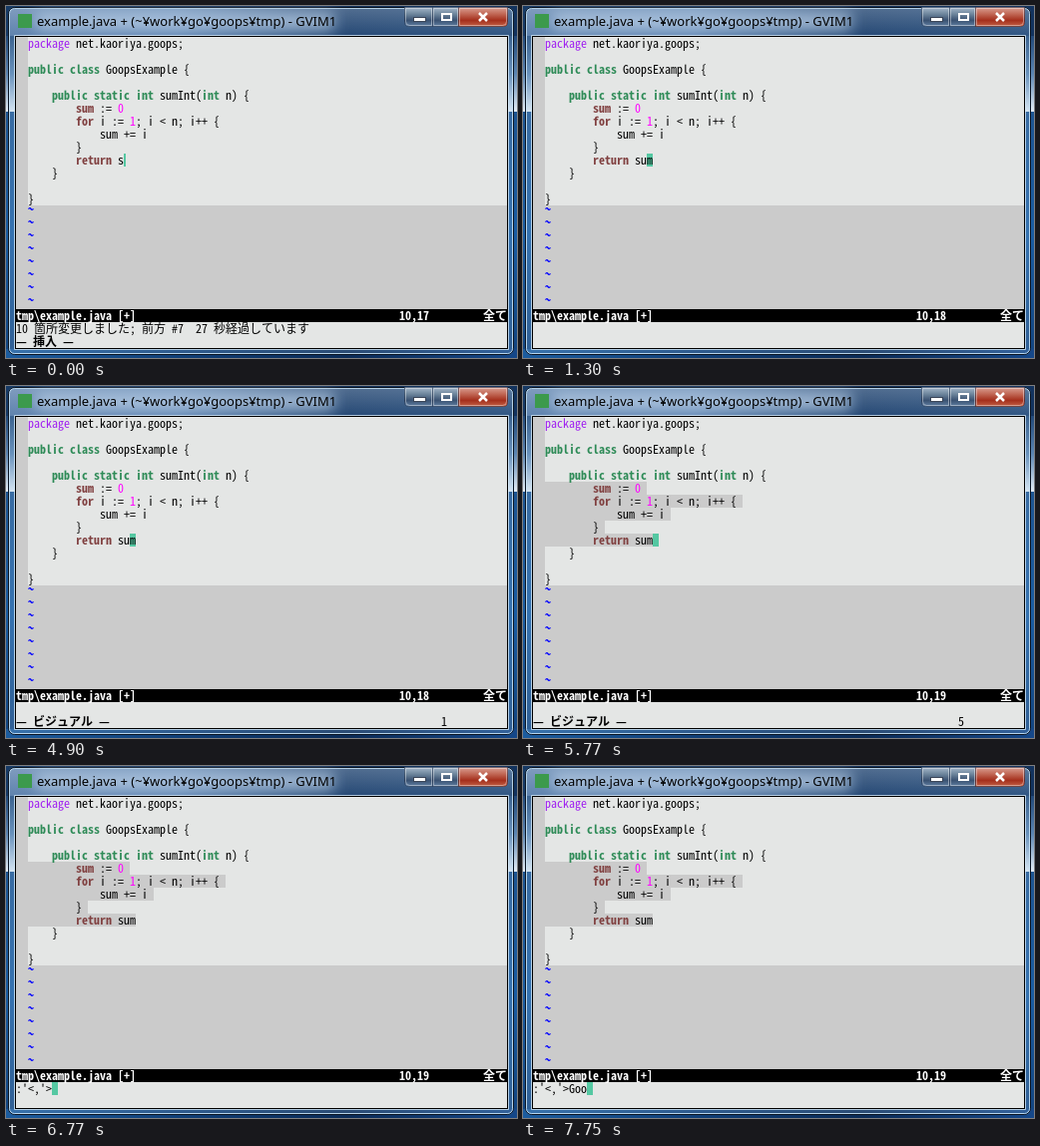
An HTML page with a canvas that plays this animation: 512 px wide and 353 px high, repeating every 8000 ms.

```html
<!DOCTYPE html>
<html lang="ja">
<meta charset="utf-8">
<title>GVIM</title>
<style>
html, body { margin: 0; height: 100%; overflow: hidden; }
canvas { display: block; }
</style>
<canvas id="stage" width="512" height="353"></canvas>
<script>
const ctx = document.getElementById('stage').getContext('2d');
const CELL = 6, ROW = 13, LEFT = 10, TOP = 31, CODE = 2;
const PAPER = '#e4e6e5', GRAY = '#cbcbcb', INK = '#000', CURSOR = '#55c8a2';
const MONO = '"Noto Sans Mono CJK JP", "Noto Sans CJK JP", "Noto Sans Mono", monospace';
const STYLES = {
  g: ['#2e8b57', 'bold'], b: ['#804040', 'bold'],
  p: ['#a020f0', ''], m: ['#ff00ff', ''], n: [INK, '']
};

// A segment may start with a style key: "g|public".
const SOURCE = [
  ['p|package', ' net.kaoriya.goops;'],
  [],
  ['g|public class', ' GoopsExample {'],
  [],
  ['    ', 'g|public static int', ' sumInt(', 'g|int', ' n) {'],
  ['        ', 'b|sum', ' := ', 'm|0'],
  ['        ', 'b|for', ' i := ', 'm|1', '; i < n; i++ {'],
  ['            sum += i'],
  ['        }'],
  ['        ', 'b|return', ' '],
  ['    }'],
  [],
  ['}']
];
const SELECTED = [17, 33, 21, 10, 18];   // columns highlighted from row 5 on

const INSERT = { note: '10 箇所変更しました; 前方 #7  27 秒経過しています', mode: '— 挿入 —', bar: true };
const VISUAL = '— ビジュアル —';
const command = text => ({ typed: 'sum', col: 19, selected: true, note: ":'<,'>" + text, prompt: true });
const STEPS = [
  [0, { ...INSERT, typed: 's', col: 17 }],
  [190, { ...INSERT, typed: 'su', col: 18 }],
  [610, { ...INSERT, typed: 'sum', col: 19 }],
  [1300, { typed: 'sum', col: 18 }],
  [4900, { typed: 'sum', col: 18, mode: VISUAL, keys: '1' }],
  [5210, { typed: 'sum', col: 18, mode: VISUAL, keys: 'i' }],
  [5770, { typed: 'sum', col: 19, mode: VISUAL, keys: '5', selected: true }],
  [6770, command('')],
  [7450, command('G')],
  [7570, command('Go')],
  [7750, command('Goo')]
];

const x = col => LEFT + col * CELL;
const y = row => TOP + row * ROW;

function box(color, left, top, width, height) {
  ctx.fillStyle = color;
  ctx.fillRect(left, top, width, height);
}

function outline(color, left, top, width, height, radius = 0) {
  ctx.beginPath();
  ctx.roundRect(left + .5, top + .5, width - 1, height - 1, radius);
  ctx.strokeStyle = color;
  ctx.stroke();
}

function cells(color, col, row, cols, rows = 1) {
  box(color, x(col), y(row), cols * CELL, rows * ROW);
}

function text(str, col, row, color = INK, weight = '') {
  ctx.font = `${weight} 12px ${MONO}`;
  ctx.fillStyle = color;
  ctx.fillText(str, x(col), y(row) + 11);
}

function gradient(x0, y0, x1, y1, ...colors) {
  const fill = ctx.createLinearGradient(x0, y0, x1, y1);
  colors.forEach((c, i) => fill.addColorStop(i / (colors.length - 1), c));
  return fill;
}

function button(left, width, radii, ...colors) {
  outline('#1a2b45', left, 1, width, 20, radii);
  ctx.fillStyle = gradient(0, 1, 0, 21, ...colors);
  ctx.fill();
  outline('rgba(255,255,255,.4)', left + 1, 2, width - 2, 18, radii);
}

// Wallpaper seen around and through the window: sky, bright horizon, deep blue.
function drawWallpaper() {
  box(gradient(0, 0, 512, 0, '#163a66', '#0d2c55', '#12335f'), 0, 0, 512, 30);
  box(gradient(0, 30, 0, 106, '#21497a', '#5c86b3', '#e6eff7'), 0, 30, 512, 76);
  box(gradient(0, 106, 0, 353, '#1d5592', '#1a5da3', '#12447f'), 0, 106, 512, 247);
  box(gradient(0, 0, 512, 0, '#1b5c9f', '#0f3f78', '#0a2b57', '#15488a'), 0, 344, 512, 9);
}

function drawFrame() {
  drawWallpaper();
  ctx.beginPath();
  ctx.roundRect(2, 1, 507, 349, 6);
  ctx.fillStyle = 'rgba(150,185,220,.22)';
  ctx.fill();
  box(gradient(0, 0, 512, 0, '#5a7fab', '#5b82b0', '#1f4370', '#2a5180'), 4, 3, 503, 27);
  box(gradient(0, 3, 0, 30, 'rgba(255,255,255,.22)', 'rgba(255,255,255,.03)'), 4, 3, 503, 27);
  outline('#0a1524', 2, 1, 507, 349, 6);
  outline('rgba(205,232,250,.85)', 3, 2, 505, 347, 5);
  outline('rgba(215,235,250,.8)', 8, 29, 496, 316);

  // Soft glow behind the title: only the shadow of an off-stage bar shows.
  ctx.save();
  ctx.shadowColor = 'rgba(190,211,234,.8)';
  ctx.shadowBlur = 14;
  ctx.shadowOffsetX = 1000;
  box(INK, 30 - 1000, 8, 298, 15);
  ctx.restore();
  box('#3c9a4c', 12, 8, 14, 14);
  ctx.font = '13px "Noto Sans", sans-serif';
  ctx.fillStyle = INK;
  ctx.fillText('example.java + (~¥work¥go¥goops¥tmp) - GVIM1', 31, 20);

  const glass = ['#a9bacd', '#71899f', '#3a5272', '#6483a6'];
  button(399, 29, [0, 0, 0, 4], ...glass);
  button(427, 27, 0, ...glass);
  button(453, 50, [0, 0, 4, 0], '#dba296', '#c26a58', '#a52f1c', '#c4654a');
  box('#3b4658', 408, 11, 13, 5);
  box('#fff', 409, 12, 11, 3);
  ctx.strokeStyle = '#fff';
  ctx.lineWidth = 2;
  ctx.strokeRect(437, 8, 9, 6);
  ctx.beginPath();
  ctx.moveTo(474, 7); ctx.lineTo(482, 15);
  ctx.moveTo(482, 7); ctx.lineTo(474, 15);
  ctx.lineWidth = 2.5;
  ctx.stroke();
  ctx.lineWidth = 1;
}

function drawEditor(s) {
  box(INK, 9, 30, 494, 314);
  box(PAPER, 10, 31, 492, 312);
  cells(GRAY, 0, 0, CODE, 13);
  cells(GRAY, 0, 13, 82, 8);
  if (s.selected) SELECTED.forEach((cols, i) => cells(GRAY, CODE, 5 + i, cols));
  if (!s.prompt) box(CURSOR, x(CODE + s.col - 1), y(9), s.bar ? 2 : CELL, ROW);

  SOURCE.forEach((line, row) => {
    let col = CODE;
    for (const part of row === 9 ? [...line, s.typed] : line) {
      const [, key = 'n', str] = part.match(/^(?:(\w)\|)?(.*)$/);
      text(str, col, row, ...STYLES[key]);
      col += str.length;
    }
  });
  for (let row = 13; row < 21; row++) text('~', CODE, row - .25, '#00f', 'bold');

  cells(INK, 0, 21, 82);
  text('tmp\\example.java [+]', 0, 21, '#fff', 'bold');
  text('10,' + s.col, 64, 21, '#fff', 'bold');
  text('全て', 78, 21, '#fff', 'bold');

  const note = s.note || '';
  if (s.prompt) cells(CURSOR, note.length, 22, 1);
  text(note, 0, 22);
  text(s.mode || '', 0, 23, INK, 'bold');
  text(s.keys || '', 71, 23);
}

function tick(now) {
  const time = now % 8000;
  drawFrame();
  drawEditor(STEPS.findLast(([start]) => start <= time)[1]);
  requestAnimationFrame(tick);
}
requestAnimationFrame(tick);
</script>
</html>
```
